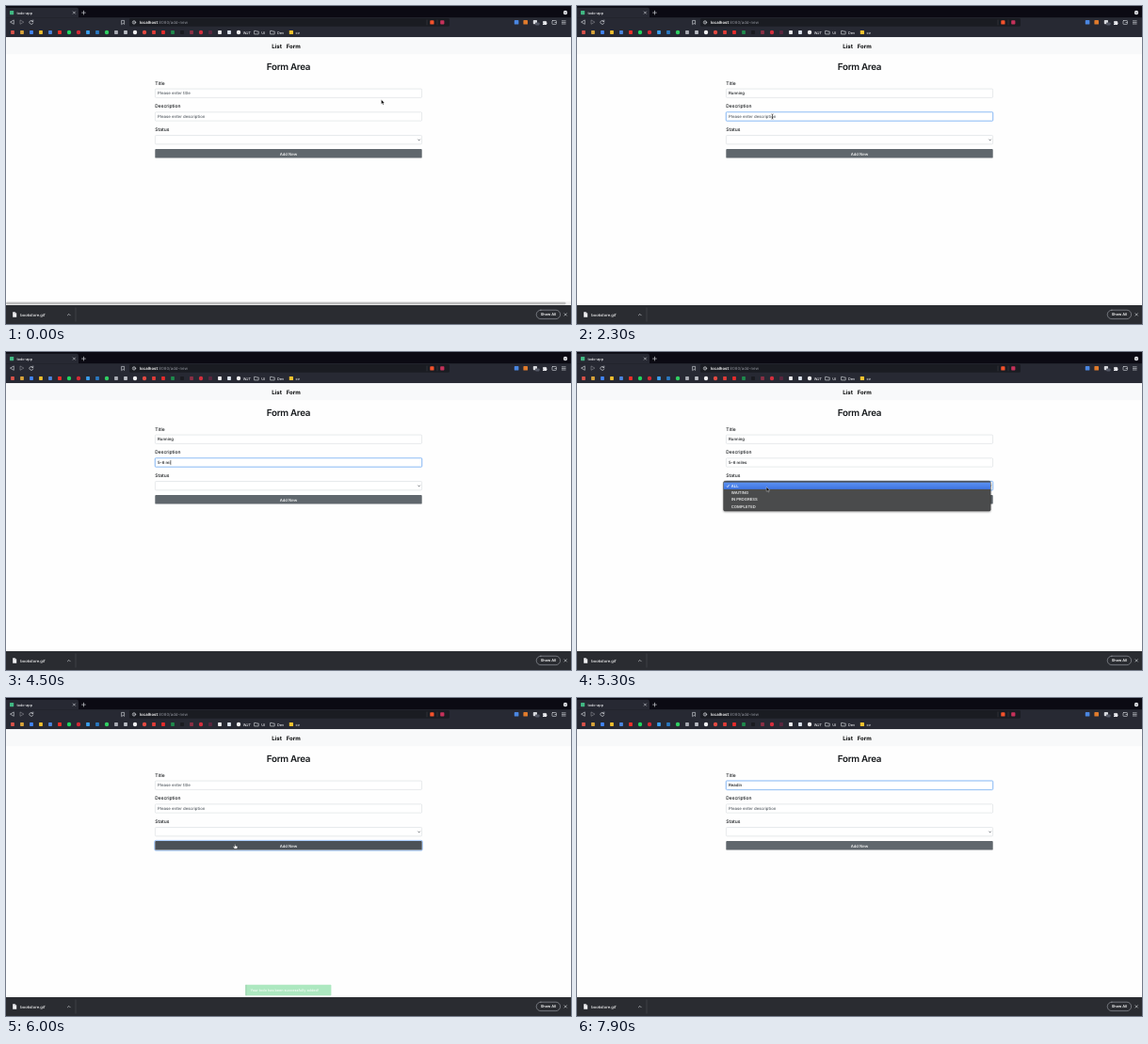
An HTML page that plays this animation: 600x338 px, repeating every 8000 ms.

```html
<!DOCTYPE html>
<html lang="en">
<head>
<meta charset="utf-8">
<title>todo-app</title>
<style>
  html, body { margin: 0; width: 100%; height: 100%; overflow: hidden; background: #fff; }
  svg { position: fixed; left: 0; top: 0; width: 600px; height: 338px; }
  text { font-family: Inter, "Open Sans", sans-serif; text-rendering: geometricPrecision; white-space: pre; }
  .line { fill: none; stroke: #d3d5da; stroke-width: .65; stroke-linecap: round; stroke-linejoin: round; }
  .label { font-size: 4.95px; font-weight: 500; fill: #111417; }
  .value { font-size: 4.35px; font-weight: 500; fill: #15181b; }
  .box { fill: #fff; stroke: #cfd4d9; stroke-width: .5; }
  .ring { fill: none; stroke: #0d6efd; stroke-opacity: .2; stroke-width: .7; }
  .focus .box { stroke: #64a4ee; stroke-width: .65; }
  g:not(.focus) > .ring { display: none; }
  .empty .value { fill: #565d64; }
  .mark { font-size: 3.8px; font-weight: 500; fill: #eeeff2; }
  .option { font-size: 4.2px; font-weight: 500; fill: #fff; }
</style>
</head>
<body>
<svg viewBox="0 0 600 338">
  <defs>
    <linearGradient id="pick" x2="0" y2="1">
      <stop stop-color="#5b91f2"/><stop offset="1" stop-color="#3e74e2"/>
    </linearGradient>
    <filter id="soft" x="-5%" y="-20%" width="110%" height="150%"><feGaussianBlur stdDeviation="1.2"/></filter>
  </defs>

  <rect width="600" height="338" fill="#fefefe"/>

  <!-- browser top -->
  <rect width="600" height="33.2" fill="#272933"/>
  <rect width="600" height="12.2" fill="#0b0a13"/>
  <path d="M0 12.2V1.8H75Q77 1.8 77 4V12.2Z" fill="#272933"/>
  <rect x="4" y="5" width="4.2" height="4.2" rx=".6" fill="#41b883"/>
  <text x="11.4" y="8.5" font-size="3.75" font-weight="500" fill="#f4f5f7">todo-app</text>
  <path class="line" d="M71.3 6l2.2 2.2m0-2.2l-2.2 2.2M82.5 5.2v3.8m-1.9-1.9h3.8"/>
  <circle cx="594" cy="7" r="2.2" fill="#e3e4e8"/>
  <path d="M593.1 6.6l.9.9.9-.9" fill="none" stroke="#0b0a13" stroke-width=".6"/>
  <path class="line" d="M8.3 15.3v4l-3.5-2z"/>
  <path class="line" opacity=".5" d="M15 15.3v4l3.5-2z"/>
  <path class="line" d="M28.5 16.2a2 2 0 1 0 .3 1.7M28.8 15v1.5h-1.5"/>
  <path class="line" d="M123 15.4h2.6v4l-1.3-1-1.3 1z"/>
  <rect x="131" y="13" width="340" height="8.8" rx="1.4" fill="#1a1c22"/>
  <circle class="line" cx="136" cy="17.4" r="1.7"/>
  <path class="line" d="M136 17.3v.9m0-1.8v.05"/>
  <text x="141.8" y="19" font-size="4.35" fill="#8f929b"><tspan fill="#fff" font-weight="600">localhost</tspan>:8080/add-new</text>
  <path d="M447 14.5v5.8M458 14.5v5.8" stroke="#44464f" stroke-width=".5"/>
  <rect x="450.3" y="15.2" width="4.2" height="4.4" rx=".7" fill="#f4522c"/>
  <rect x="461.2" y="15.3" width="4.2" height="4.2" rx=".7" fill="#c5325a"/>
  <rect x="539.8" y="15" width="4.6" height="4.6" rx=".7" fill="#4a86e0"/>
  <rect x="549.4" y="15" width="4.6" height="4.6" rx=".7" fill="#e07b2c"/>
  <rect x="559.8" y="15" width="4.2" height="4.2" rx=".7" fill="#d5d7dc"/>
  <rect x="562" y="17.4" width="4.6" height="3" rx=".8" fill="#555966"/>
  <path d="M570 16.2h1.3a.8.8 0 0 1 1.5 0h1.3v1.2a.8.8 0 0 1 0 1.5v1.2h-4.1v-1.2a.8.8 0 0 0 0-1.5z" fill="#e6e7eb"/>
  <rect class="line" x="580" y="15.5" width="4.4" height="3.9" rx=".6"/>
  <path class="line" d="M582.9 17.5h1.2M590.4 15.8h3.8m-3.8 1.6h3.8m-3.8 1.6h3.8"/>
  <g id="marks"></g>
  <text class="mark" x="251.7" y="29.5">WJT</text>
  <text class="mark" x="271.2" y="29.5">UI</text>
  <text class="mark" x="288" y="29.5">Dev</text>
  <text class="mark" x="307.6" y="29.5">cv</text>

  <!-- page -->
  <rect y="33.2" width="600" height="18" fill="#f8f9fa"/>
  <text x="282.2" y="44.5" font-size="6.05" font-weight="700" fill="#050607">List</text>
  <text x="297.7" y="44.5" font-size="6.05" font-weight="700" fill="#050607">Form</text>
  <text x="300" y="68.3" font-size="9.8" font-weight="600" letter-spacing="-.3" text-anchor="middle" fill="#15181b">Form Area</text>
  <g id="form"></g>
  <g id="button">
    <rect class="ring" x="157.7" y="151.4" width="284.6" height="10.8" rx="1.5" style="stroke-opacity:.55"/>
    <rect id="face" x="158.3" y="152" width="283.4" height="9.6" rx=".9"/>
    <text x="300" y="158.5" font-size="4.25" font-weight="500" text-anchor="middle" fill="#fff">Add New</text>
  </g>
  <g id="menu">
    <rect x="155.5" y="138" width="283.8" height="32" rx="1.5" opacity=".4" filter="url(#soft)"/>
    <rect x="155.6" y="137.2" width="283.6" height="31.8" rx="1.5" fill="#4a4b4c" stroke="#2f3031" stroke-width=".4"/>
    <rect id="hover" x="155.8" width="283.2" height="7.3" fill="url(#pick)"/>
    <path d="M158.9 142.5l1 1.2 1.6-2.7" fill="none" stroke="#fff" stroke-width=".65"/>
  </g>
  <g id="toast">
    <rect x="254.4" y="304.8" width="91" height="11.4" rx=".6" fill="#5fd384"/>
    <rect x="254.4" y="304.8" width="1" height="11.4" fill="#35a55c"/>
    <text x="259.4" y="311.8" font-size="3.8" font-weight="500" fill="#f3fff5">Your todo has been successfully added!</text>
  </g>
  <g id="scroll">
    <rect y="314" width="600" height="4" fill="#f4f4f4"/>
    <rect y="314.7" width="594.5" height="2.6" rx="1.3" fill="#bdbdbd"/>
  </g>

  <!-- download bar -->
  <rect y="318" width="600" height="20" fill="#2a2c31"/>
  <path d="M7.2 325.2h2.4l1.6 1.6v3.9h-4z" fill="#f1f1f3"/>
  <path d="M9.5 325.2v1.7h1.7" fill="none" stroke="#8d9097" stroke-width=".4"/>
  <text x="15.2" y="329.5" font-size="4.15" font-weight="500" fill="#fafafb">bookstore.gif</text>
  <path class="line" d="M65.4 328.8l1.4-1.4 1.4 1.4M593 326.7l2.4 2.4m0-2.4l-2.4 2.4"/>
  <path d="M74 320.5v15" stroke="#50535a" stroke-width=".5"/>
  <rect class="line" x="563.2" y="323.2" width="25.4" height="9.4" rx="4.7" style="stroke:#9a9da4"/>
  <text x="575.9" y="329.4" font-size="3.9" font-weight="600" text-anchor="middle" fill="#fff">Show All</text>

  <g id="pointer">
    <path id="arrow" d="M0 0v4.7l1.1-1 .8 1.8.9-.4-.8-1.7h1.5z" fill="#000" stroke="#fff" stroke-width=".35"/>
    <path id="beam" d="M-1-2.6q1 0 1 .7v3.8q0 .7-1 .7M1-2.6q-1 0-1 .7m0 3.8q0 .7 1 .7M-.5.9h1" fill="none" stroke="#111" stroke-width=".55"/>
    <path id="hand" d="M-.5.3q.6-.6 1 .1v1.5l1.6.4q.7.2.6 1L2.3 5H-.7L-2.2 2.8q0-.7.7-.4l1 .7z" fill="#fff" stroke="#111" stroke-width=".35"/>
  </g>
</svg>
<script>
const LOOP = 8000, STEP = 100;
const $ = id => document.getElementById(id);

const markColors = `#d9534a #d8a33a #4285f4 #f2bf2e #4a86e0 #f0302a #1ed760 #d32a36 #3a9ff0 #2a78c0
  #30cf62 #a9acb4 #b9bcc3 #f0f0f2 #e24a42 #e03c38 #e52c2c #1f8a4c #1a1b20 #8c2f45 #d42f3e #5b2740
  #f2f2f4 #dfe6f2 #f0f0f2`.split(/\s+/);
const round = [6, 7, 10, 13, 14, 20, 24];
$('marks').innerHTML = markColors.map((c, i) => {
  const x = 7 + i * 10;
  return round.includes(i)
    ? `<circle cx="${x}" cy="28" r="2.2" fill="${c}"/>`
    : `<rect x="${x - 1.9}" y="26.1" width="3.8" height="3.8" rx=".6" fill="${c}"/>`;
}).join('') + [264, 281].map(x =>
  `<path class="line" d="M${x} 26.4h1.5l.5.6h2.2v2.9h-4.2z"/>`).join('') +
  '<rect x="300.8" y="25.9" width="4.2" height="4.2" rx=".6" fill="#f2c12e"/>';

const fields = [
  { id: 'title', label: 'Title', y: 88, hint: 'Please enter title' },
  { id: 'desc', label: 'Description', y: 112.7, hint: 'Please enter description' },
  { id: 'status', label: 'Status', y: 137.4, hint: '' }
];
$('form').innerHTML = fields.map(({ id, label, y }) => `<g id="${id}">
  <text class="label" x="158.3" y="${y - 4.4}">${label}</text>
  <rect class="ring" x="157.9" y="${y - .4}" width="284.2" height="10.3" rx="1.4"/>
  <rect class="box" x="158.4" y="${y + .1}" width="283.2" height="9.3" rx="1"/>
  <text class="value" x="161" y="${y + 6.4}"></text>
  <rect class="caret" y="${y + 2.2}" width=".5" height="5.2" fill="#111"/></g>`).join('') +
  '<path d="M437.4 141.7l1.2 1.2 1.2-1.2" fill="none" stroke="#343a40" stroke-width=".7"/>';

const options = ['ALL', 'WAITING', 'IN PROGRESS', 'COMPLETED'];
$('menu').innerHTML += options.map((o, i) =>
  `<text class="option" x="163.8" y="${143.8 + i * 7.25}">${o}</text>`).join('');

// [time, value] steps
const values = {
  title: [[0, ''], [600, 'R'], [700, 'Ru'], [800, 'Run'], [900, 'Runn'], [1000, 'Runnin'], [1100, 'Running'],
    [6000, ''], [7300, 'R'], [7400, 'Re'], [7500, 'Rea'], [7700, 'Read'], [7800, 'Readi'], [7900, 'Readin']],
  desc: [[0, ''], [3200, '5'], [3600, '5-'], [3900, '5-6'], [4200, '5-6 '], [4400, '5-6 m'], [4500, '5-6 mi'],
    [4600, '5-6 mile'], [4700, '5-6 miles'], [6000, '']],
  status: [[0, ''], [5600, 'WAITING'], [6000, '']]
};
// [time, focused part, caret allowed]
const focus = [[0, ''], [300, 'title', 1], [1700, 'desc', 1], [4900, 'desc', 0], [5200, 'status', 0],
  [5900, 'button', 0], [6600, 'title', 1], [7800, 'title', 0]];
// [time, x, y]
const path = [[0, 398.5, 99.5], [400, 237, 94.4], [1200, 237, 94.4], [1500, 235.5, 114.2], [1700, 226, 117.5],
  [2100, 207.5, 117.5], [5000, 207.5, 117.5], [5200, 202, 142.5], [5300, 201.2, 143.5], [5500, 202, 149],
  [5600, 204, 150], [5900, 243.2, 155.2], [6100, 243.2, 155.2], [6600, 187.6, 94.8], [8000, 187.6, 94.8]];
const hidden = [[600, 1300], [3100, 4700], [7200, 8000]];

const last = (rows, t) => rows.filter(r => r[0] <= t).pop();
const ramp = (t, a, b) => Math.min(1, Math.max(0, (t - a) / (b - a)));
const within = (t, a, b) => t >= a && t < b;
const show = (el, on) => { el.style.display = on ? '' : 'none'; };

function position(t) {
  const i = path.findIndex(p => p[0] > t);
  const [a, ax, ay] = path[i - 1], [b, bx, by] = path[i];
  const k = ramp(t, a, b), e = k * k * (3 - 2 * k);
  return [ax + (bx - ax) * e, ay + (by - ay) * e];
}

function drawField({ id, hint }, t, active) {
  const g = $(id), text = g.querySelector('.value'), bar = g.querySelector('.caret');
  const [since, value] = last(values[id], t);
  const on = active[1] === id;
  g.setAttribute('class', (on ? 'focus ' : '') + (value ? '' : 'empty'));
  text.textContent = value || hint;
  const blink = Math.floor((t - Math.max(since, active[0])) / 500) % 2 === 0;
  show(bar, on && active[2] && blink);
  bar.setAttribute('x', 161 + (value ? text.getComputedTextLength() + .2 : 0));
}

function draw(t) {
  const active = last(focus, t), [x, y] = position(t);
  fields.forEach(f => drawField(f, t, active));

  const open = within(t, 5200, 5600), onButton = !open && within(y, 151.5, 162);
  $('button').setAttribute('class', active[1] === 'button' ? 'focus' : '');
  $('face').setAttribute('fill', onButton ? '#4b5157' : '#60676d');

  show($('menu'), open);
  const row = Math.max(0, Math.min(3, Math.floor((y - 138.6) / 7.25)));
  $('hover').setAttribute('y', 138.6 + row * 7.25);

  $('toast').style.opacity = t < 6000 ? 0 : ramp(t, 5900, 6100) * (1 - ramp(t, 7300, 7600));
  $('scroll').style.opacity = 1 - ramp(t, 0, 400);

  const inText = within(y, 88, 97.5) || within(y, 112.7, 122.2) || within(t, 1400, 1700);
  show($('pointer'), !hidden.some(([a, b]) => within(t, a, b)));
  $('pointer').setAttribute('transform', `translate(${x} ${y})`);
  show($('beam'), inText);
  show($('hand'), onButton);
  show($('arrow'), !inText && !onButton);
}

const start = performance.now();
function tick() {
  const t = (performance.now() - start) % LOOP;
  draw(Math.floor(t / STEP) * STEP);
  requestAnimationFrame(tick);
}
tick();
</script>
</body>
</html>
```
